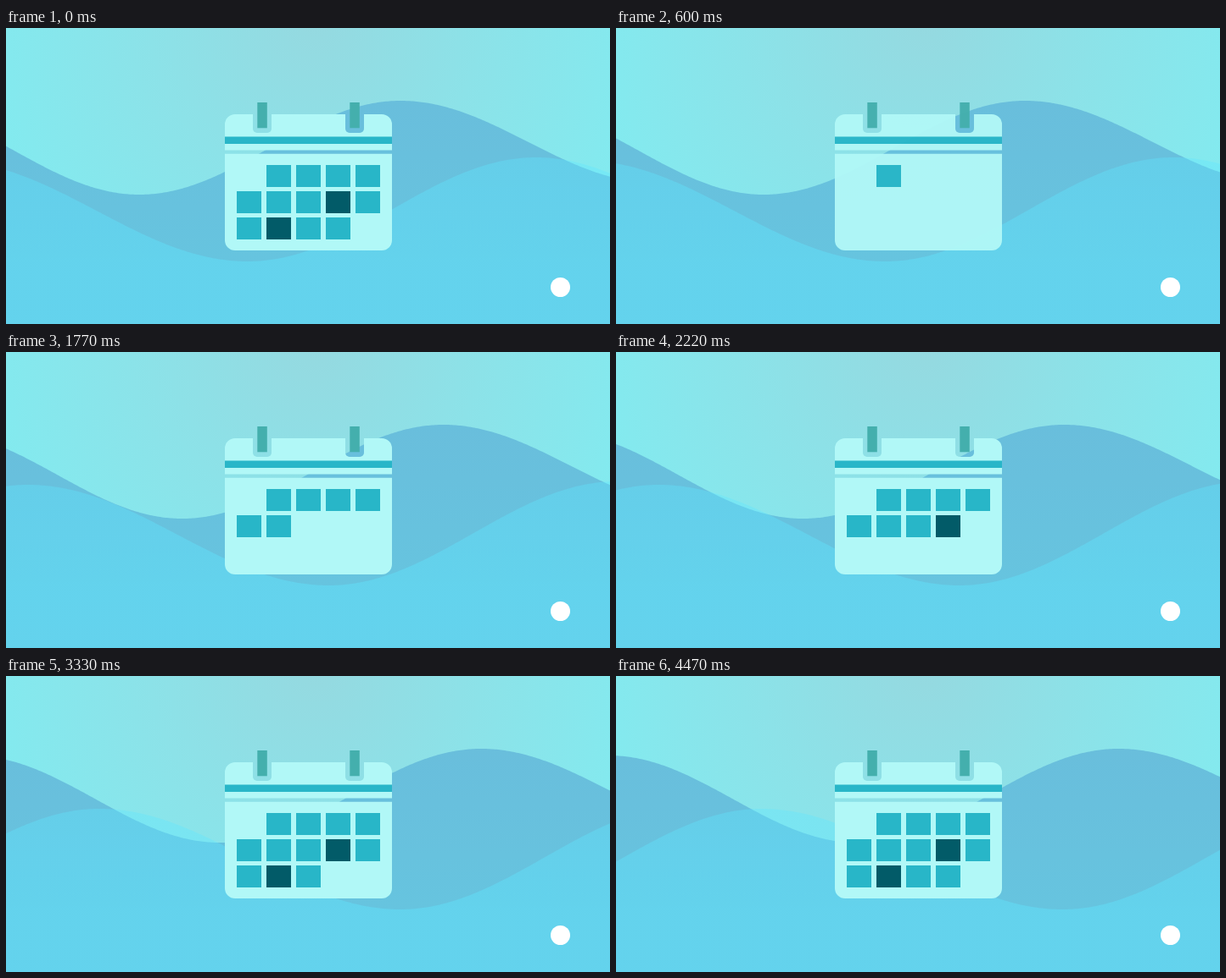
These frames come from a looping animation (712 by 350 pixels, 4.5 s). An HTML page with a canvas:

```html
<!DOCTYPE html>
<html lang="en">
<head>
<meta charset="utf-8">
<title>Calendar on waves</title>
<style>
html, body { margin: 0; width: 100%; height: 100%; overflow: hidden; background: #84eaee; }
canvas { display: block; }
</style>
</head>
<body>
<canvas id="stage" width="712" height="350"></canvas>
<script>
const W = 712, H = 350, LOOP = 4500, STEP = 30;
const ctx = document.getElementById('stage').getContext('2d');

const layer = document.createElement('canvas');
layer.width = W;
layer.height = H;
const cal = layer.getContext('2d');

const FADE_OUT = 240, FADE_IN = 450;
const FIRST_CELL = 430, CELL_GAP = 245;

function withStops(gradient, ...colors) {
  colors.forEach((color, i) => gradient.addColorStop(i / (colors.length - 1), color));
  return gradient;
}

const sky = withStops(ctx.createRadialGradient(365, -10, 0, 365, -10, 390),
  '#95d9e0', '#8ce2e8', '#83eaef');

// Each wave eases between its crests and troughs and drifts right (px/s).
const waves = [
  {
    knots: [[-136, 94], [157, 197], [465, 86], [765, 183]],
    speed: 28.5,
    fill: withStops(ctx.createLinearGradient(0, 86, 0, 276), '#69bedc', '#66c4df')
  },
  {
    knots: [[-402, 276], [-70, 157], [285, 276], [625, 153], [965, 276]],
    speed: 54,
    fill: withStops(ctx.createLinearGradient(0, 153, 0, 290),
      'rgba(96,230,255,.36)', 'rgba(96,230,255,.43)')
  }
];

function waveHeight(knots, x) {
  let i = 0;
  while (i < knots.length - 2 && x > knots[i + 1][0]) i++;
  const [x0, y0] = knots[i], [x1, y1] = knots[i + 1];
  const u = Math.min(1, Math.max(0, (x - x0) / (x1 - x0)));
  return y0 + (y1 - y0) * (1 - Math.cos(Math.PI * u)) / 2;
}

function drawWave({ knots, speed, fill }, t) {
  const shift = speed * t / 1000;
  ctx.beginPath();
  ctx.moveTo(0, H);
  for (let x = 0; x <= W; x += 2) ctx.lineTo(x, waveHeight(knots, x - shift));
  ctx.lineTo(W, H);
  ctx.fillStyle = fill;
  ctx.fill();
}

function box(color, x, y, w, h, radius = 0) {
  cal.fillStyle = color;
  cal.beginPath();
  cal.roundRect(x, y, w, h, radius);
  cal.fill();
}

function drawCalendar(cellCount) {
  cal.clearRect(0, 0, W, H);
  box('#b1f8f7', 258, 102, 197, 161, 12);
  box('#28b6c8', 258, 128.5, 197, 8.5);

  cal.globalCompositeOperation = 'destination-out';
  box('#000', 258, 144.5, 197, 4.3);
  for (const x of [291, 400]) box('#000', x, 98, 22, 26, [0, 0, 5, 5]);
  cal.globalCompositeOperation = 'source-over';

  for (const x of [296.3, 405.3]) box('#44afad', x, 88, 11.5, 30.3);

  // The month starts in the second column.
  for (let day = 1; day <= cellCount; day++) {
    const color = day === 8 || day === 11 ? '#025b68' : '#28b6c8';
    box(color, 272 + 35 * (day % 5), 162 + 31 * Math.floor(day / 5), 29, 26);
  }
}

function calendarState(t) {
  if (t < FADE_OUT) return { alpha: 1 - t / FADE_OUT, cells: 13 };
  const u = Math.min(1, (t - FADE_OUT) / FADE_IN);
  const shown = Math.floor((t - FIRST_CELL) / CELL_GAP) + 1;
  return { alpha: 1 - (1 - u) ** 2, cells: Math.min(13, Math.max(0, shown)) };
}

function draw(t) {
  ctx.fillStyle = sky;
  ctx.fillRect(0, 0, W, H);
  for (const wave of waves) drawWave(wave, t);

  const { alpha, cells } = calendarState(t);
  drawCalendar(cells);
  ctx.globalAlpha = alpha;
  ctx.drawImage(layer, 0, 0);
  ctx.globalAlpha = 1;

  ctx.fillStyle = '#fff';
  ctx.beginPath();
  ctx.arc(653.5, 306.5, 11.5, 0, Math.PI * 2);
  ctx.fill();
}

function tick() {
  const t = performance.now() % LOOP;
  draw(Math.floor(t / STEP) * STEP);
  requestAnimationFrame(tick);
}
tick();
</script>
</body>
</html>
```
